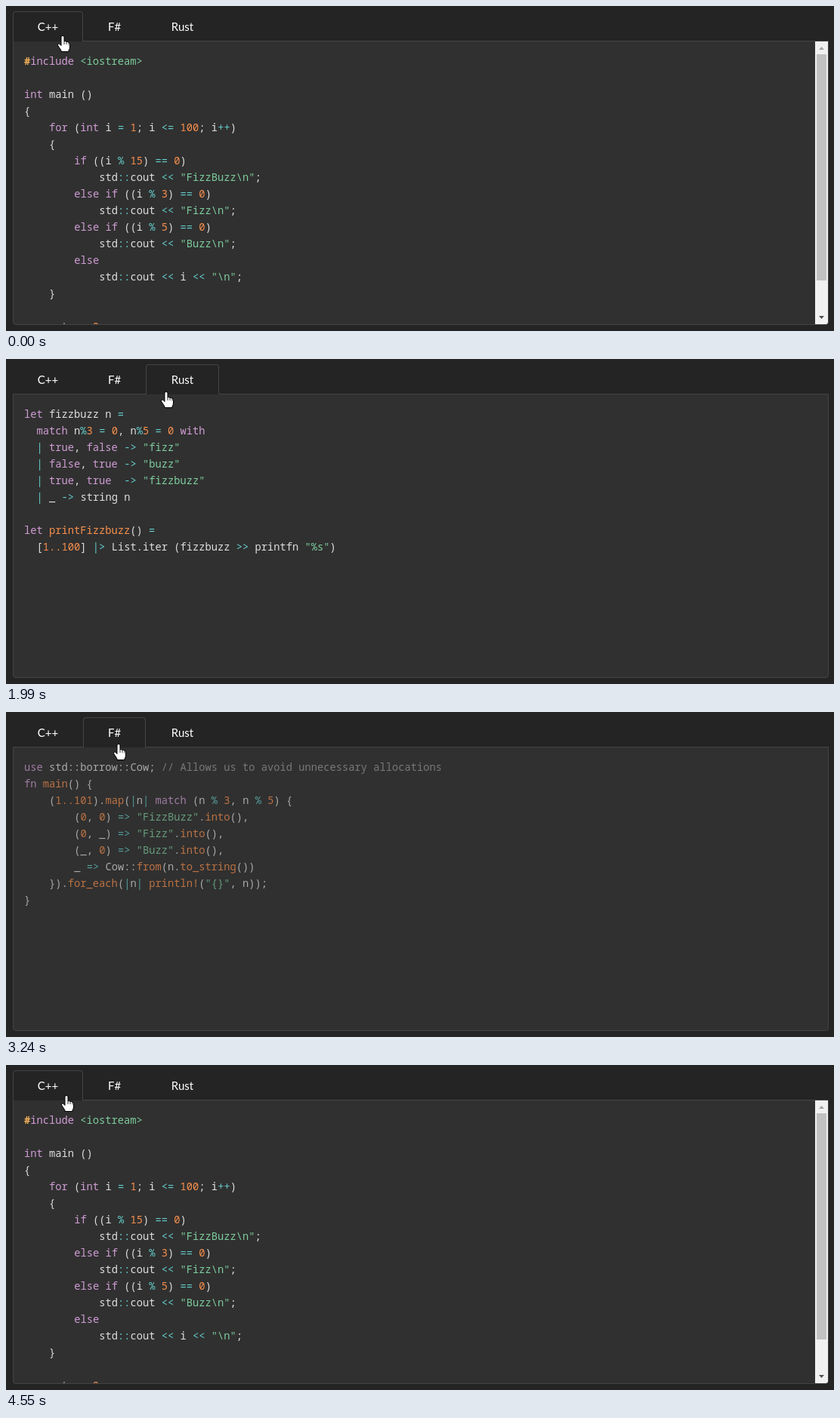
Recreate the animation shown at these times as an HTML page. Size 1096x431 px, loop 4630 ms.

```html
<!DOCTYPE html>
<html lang="en">
<head>
<meta charset="utf-8">
<title>Code tabs</title>
<style>
  html, body { margin: 0; width: 100%; height: 100%; overflow: hidden; background: #242424; }
  body { position: relative; }
  div, pre, svg { position: absolute; box-sizing: border-box; margin: 0; }
  .panel { left: 9px; top: 46px; width: 1080px; height: 377px; overflow: hidden;
    background: #303030; border: 1px solid #444; border-radius: 0 0 4px 4px; }
  .pane { inset: 0; }
  pre { left: 14px; top: 15px; color: #dedede;
    font: 13.75px/22px "Noto Sans Mono", monospace; }
  .tab { top: 7px; height: 40px; padding: 8px 0; text-align: center; color: #fff;
    font: 15px/22.5px Lato, sans-serif; border: 1px solid transparent;
    border-bottom: 0; border-radius: 4px 4px 0 0; }
  .hover { border-color: #444; }
  .active { border-color: #444; background: #242424; }
  .hash { color: #fbb65b; font-weight: bold; }
  .key { color: #d09dd5; }
  .str { color: #7dcc9d; }
  .num, .fn { color: #f88f4d; }
  .op { color: #65cdcb; }
  .note { color: #999; }
  #bar { left: 1061px; top: 0; }
  #cursor { left: 0; top: 0; width: 1096px; height: 431px; }
</style>
</head>
<body>
<div class="panel">
  <div class="pane">
    <svg id="bar" width="17" height="375">
      <path fill="#f1f1f1" d="M0 0h17v375H0z"/>
      <path fill="#c1c1c1" d="M2 17h13v300H2z"/>
      <path fill="#a3a3a3" d="M5 11l3.5-4 3.5 4z"/>
      <path fill="#505050" d="M5 364l3.5 4 3.5-4z"/>
    </svg>
  </div>
  <div class="pane"></div>
  <div class="pane"></div>
</div>
<div class="tab" style="left:9px;width:93px">C++</div>
<div class="tab" style="left:102px;width:83px">F#</div>
<div class="tab" style="left:185px;width:97px">Rust</div>
<svg id="cursor" fill="#fff" stroke="#000" stroke-linejoin="round">
  <path id="arrow" d="M.5.5V16.5L4.2 13 6.7 18.6 9 17.6 6.5 12H11.5Z"/>
  <g id="hand">
    <path d="M-2 2Q-2 .5 0 .5 2 .5 2 2V8Q4 7 5 8.5 7 8 8 9.5 9.5 9 9.5 11.5V15Q9.5 18 8 20V21.5H-2V20L-6.5 13Q-7 10.5-4.5 11L-2 13.5Z"/>
    <path fill="none" stroke-width=".8" d="M2 8v4M5 8.5v3.5M8 9.5v3"/>
  </g>
</svg>
<script>
const LOOP = 4630;
const programs = [String.raw`#include <iostream>

int main ()
{
    for (int i = 1; i <= 100; i++)
    {
        if ((i % 15) == 0)
            std::cout << "FizzBuzz\n";
        else if ((i % 3) == 0)
            std::cout << "Fizz\n";
        else if ((i % 5) == 0)
            std::cout << "Buzz\n";
        else
            std::cout << i << "\n";
    }

    return 0;
}`, `let fizzbuzz n =
  match n%3 = 0, n%5 = 0 with
  | true, false -> "fizz"
  | false, true -> "buzz"
  | true, true  -> "fizzbuzz"
  | _ -> string n

let printFizzbuzz() =
  [1..100] |> List.iter (fizzbuzz >> printfn "%s")`,
`use std::borrow::Cow; // Allows us to avoid unnecessary allocations
fn main() {
    (1..101).map(|n| match (n % 3, n % 5) {
        (0, 0) => "FizzBuzz".into(),
        (0, _) => "Fizz".into(),
        (_, 0) => "Buzz".into(),
        _ => Cow::from(n.to_string())
    }).for_each(|n| println!("{}", n));
}`];

const syntax = new RegExp([
  String.raw`(?<str>"[^"]*"|<iostream>)`,
  String.raw`(?<note>//.*)`,
  String.raw`(?<hash>#)`,
  String.raw`(?<key>\b(?:include|int|for|if|else|return|let|match|with|true|false|use|fn)\b)`,
  String.raw`(?<fn>\b(?:main(?=\()|printFizzbuzz|map|into|from|to_string|for_each|println!))`,
  String.raw`(?<num>\d+(?:\.\.\d+)?)`,
  String.raw`(?<op>->|=>|<<|>>|<=|==|\+\+|\|>?|[=%]|::(?=cout))`,
  String.raw`\w+|[^]`
].join('|'), 'g');

const panes = [...document.querySelectorAll('.pane')];
const tabs = [...document.querySelectorAll('.tab')];
const arrow = document.getElementById('arrow');
const hand = document.getElementById('hand');

programs.forEach((code, i) => {
  const pre = document.createElement('pre');
  for (const { 0: text, groups } of code.matchAll(syntax)) {
    const kind = Object.keys(groups).find(k => groups[k]);
    const span = document.createElement('span');
    span.textContent = text;
    if (kind) span.className = kind;
    pre.append(kind ? span : text);
  }
  panes[i].prepend(pre);
});

// [time, tab]
const clicks = [[-999, 0], [890, 1], [1990, 2], [3150, 1], [4090, 0]];
// [time, x, y] of the pointer tip
const path = [
  [0, 75, 39], [60, 75, 39], [250, 84, 50], [580, 136, 50], [660, 138, 46],
  [740, 139, 45], [970, 139, 45], [1200, 167, 57], [1350, 178, 60], [1440, 181, 60],
  [1700, 198, 55], [1900, 212, 43], [2070, 212, 43], [2510, 193, 58], [2590, 186, 58],
  [2800, 170, 48], [2980, 150, 42], [3230, 150, 42], [3620, 110, 49], [3710, 95, 44],
  [3860, 88, 42], [4170, 88, 42], [4550, 80, 40], [LOOP, 80, 40]
];
const clamp = v => Math.max(0, Math.min(1, v));

function pointer(t) {
  const i = path.findIndex(p => p[0] > t);
  const [t0, x0, y0] = path[i - 1], [t1, x1, y1] = path[i];
  const k = (t - t0) / (t1 - t0);
  return [Math.round(x0 + (x1 - x0) * k), Math.round(y0 + (y1 - y0) * k)];
}

function draw(now) {
  const t = now % LOOP;
  const n = clicks.findLastIndex(c => c[0] <= t);
  const [start, current] = clicks[n];
  const previous = n ? clicks[n - 1][1] : -1;
  const [x, y] = pointer(t);
  const over = y > 46 ? -1 : x < 102 ? 0 : x < 185 ? 1 : 2;

  // the old pane fades out fully before the new one fades in
  panes.forEach((pane, i) => {
    pane.style.opacity = i === current ? clamp((t - start - 205) / 150)
      : i === previous ? 1 - clamp((t - start - 45) / 150) : 0;
  });
  tabs.forEach((tab, i) => {
    tab.classList.toggle('active', i === current);
    tab.classList.toggle('hover', i === over);
  });
  for (const shape of [arrow, hand]) {
    shape.setAttribute('transform', `translate(${x} ${y})`);
    shape.style.display = (shape === hand) === (over >= 0) ? '' : 'none';
  }
}

const begin = performance.now();
function tick() {
  draw(performance.now() - begin);
  requestAnimationFrame(tick);
}
tick();
</script>
</body>
</html>
```
